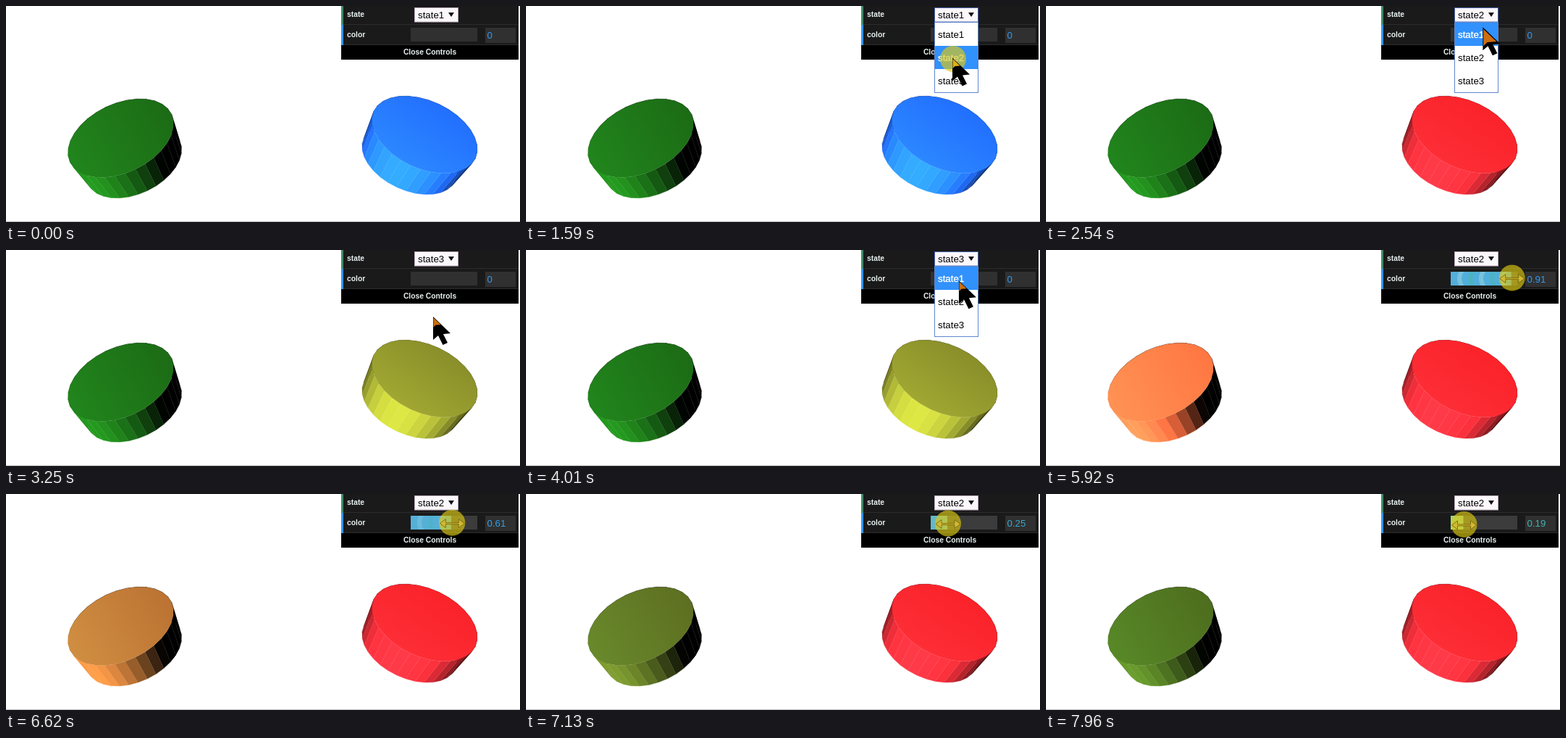
These frames come from a looping animation (710x298 px, 8 s). An HTML page:

```html
<!DOCTYPE html>
<html lang="en">
<head>
<meta charset="utf-8">
<title>Cylinder states</title>
<style>
  html, body { margin: 0; width: 100%; height: 100%; overflow: hidden; background: #fff; }
  svg { display: block; width: 710px; height: 298px; }
  text { font: 13.3px "Liberation Sans", Arial, sans-serif; }
  .label { font-size: 10.3px; font-weight: bold; fill: #e8f0f0; }
  .on { fill: #fff; stroke: #fff; stroke-width: .35px; }
</style>
</head>
<body>
<svg viewBox="0 0 710 298">
  <defs>
    <linearGradient id="gradL" gradientUnits="userSpaceOnUse" x1="95" y1="215" x2="222" y2="145"><stop/><stop offset="1"/></linearGradient>
    <linearGradient id="gradR" gradientUnits="userSpaceOnUse" x1="545" y1="218" x2="600" y2="138"><stop/><stop offset="1"/></linearGradient>
    <clipPath id="fillClip"><rect id="clipBar" x="559" y="30" height="19"/></clipPath>
  </defs>
  <rect y="297" width="710" height="1" fill="#bdbdbd"/>
  <g id="solids"></g>

  <g id="panel">
    <rect x="463" width="245" height="74"/>
    <rect x="463" width="245" height="54" fill="#2c2c2c"/>
    <rect x="463" width="245" height="25" fill="#1a1a1a"/>
    <rect x="463" y="26" width="245" height="27" fill="#1a1a1a"/>
    <rect x="463" width="3" height="26" fill="#42896a"/>
    <rect x="463" y="26" width="3" height="28" fill="#3493ee"/>
    <text class="label" x="471" y="15">state</text>
    <text class="label" x="471" y="43">color</text>
    <text class="label" x="585.5" y="67" text-anchor="middle">Close Controls</text>
    <rect id="track" x="559" y="30" width="92" height="19"/>
    <g clip-path="url(#fillClip)">
      <rect id="bar" x="559" y="30" width="92" height="19"/>
      <g id="streaks" fill="none"></g>
    </g>
    <rect x="662" y="30" width="42" height="21" fill="#303030"/>
    <text id="num" x="664.5" y="45"></text>
    <rect id="select" x="564.5" y="2.5" width="60" height="19.5" fill="#fbf7fb"/>
    <text id="value" x="569" y="17"></text>
    <path d="M611 9h8l-4 6z" fill="#111"/>
  </g>

  <g id="menu">
    <rect x="564.5" y="22.5" width="60" height="97" fill="#fff" stroke="#5f86cc"/>
    <rect id="hover" x="565" width="59" height="32" fill="#3191fd"/>
    <text x="569" y="44">state1</text>
    <text x="569" y="76">state2</text>
    <text x="569" y="108">state3</text>
  </g>

  <g id="pointer">
    <circle id="halo" r="18" fill="#dcc814" fill-opacity=".66"/>
    <g id="arrow" transform="translate(-1 -1.5)">
      <path d="M0 0V32L7 26L13.5 39L20 36L14 24L24 23Z"/>
      <path id="tint" d="M1 3V29L7 23L21 22Z"/>
    </g>
    <path id="resize" d="M-17 1L-9 -5V0H9V-5L17 1L9 7V2H-9V7Z" fill="#d2b932" stroke="#6f600a" stroke-width=".8"/>
  </g>
</svg>
<script>
const LOOP = 8000;
const $ = id => document.getElementById(id);
const set = (el, attrs) => { for (const k in attrs) el.setAttribute(k, attrs[k]); return el; };
const make = (tag, parent, attrs) =>
  parent.appendChild(set(document.createElementNS('http://www.w3.org/2000/svg', tag), attrs));
const show = (el, on) => { el.style.display = on ? '' : 'none'; };
const mix = (a, b, k) => a.map((n, i) => n + (b[i] - n) * k);
const clamp = (n, hi = 1) => Math.max(0, Math.min(hi, n));
const rgb = (c, light = 1) => `rgb(${c.map(n => Math.round(clamp(n * light, 255))).join()})`;
const rad = Math.PI / 180;
const cos = a => Math.cos(a * rad), sin = a => Math.sin(a * rad);

// Smooth step from 0 to 1 between two times.
function ease(t, from, to) {
  const k = clamp((t - from) / (to - from));
  return k * k * (3 - 2 * k);
}

// Tilted cylinder: top ellipse, plus a smaller bottom one shifted by (dx, dy).
function cylinder({ cx, cy, rx, ry, tilt, dx, dy, grad, light }) {
  const c = cos(tilt), s = sin(tilt), step = 11.25;
  const point = (a, low = 0) => {
    const k = 1 - .1 * low, x = rx * cos(a) * k, y = ry * sin(a) * k;
    return [cx + low * dx + x * c - y * s, cy + low * dy + x * s + y * c]
      .map(n => n.toFixed(2)).join();
  };
  const g = make('g', $('solids'), {});
  const angles = Array.from({ length: 32 }, (_, i) => i * step);
  const depth = a => sin(a + step / 2);
  const sides = [...angles].sort((a, b) => depth(a) - depth(b)).map(a => ({
    light: light(a + step / 2),
    el: make('polygon', g, {
      points: [point(a), point(a + step), point(a + step, 1), point(a, 1)].join(' '),
      'stroke-width': .3
    })
  }));
  make('polygon', g, { points: angles.map(a => point(a)).join(' '), fill: `url(#${grad})` });
  const stops = $(grad).children;
  return ({ near, far, side }) => {
    set(stops[0], { 'stop-color': rgb(near) });
    set(stops[1], { 'stop-color': rgb(far) });
    for (const f of sides) {
      const col = rgb(side, f.light);
      set(f.el, { fill: col, stroke: col });
    }
  };
}

const paintLeft = cylinder({
  cx: 158.5, cy: 182.3, rx: 77.6, ry: 47.5, tilt: -25.3, dx: 18.4, dy: 34, grad: 'gradL',
  light: a => a < 240 ? 1.2 * Math.max(0, sin(a - 60)) : 0
});
const paintRight = cylinder({
  cx: 578.3, cy: 177.5, rx: 77.4, ry: 46.5, tilt: 25, dx: -21, dy: 34.6, grad: 'gradR',
  light: a => .2 + .8 * Math.max(0, cos(a - 99))
});

const green = { near: [33, 132, 28], far: [28, 108, 21], side: [30, 129, 26] };
const coral = { near: [318, 146, 88], far: [290, 120, 70], side: [335, 135, 84] };
const looks = [
  { near: [44, 136, 255], far: [34, 112, 255], side: [52, 172, 400] },
  { near: [253, 46, 55], far: [251, 35, 42], side: [300, 58, 72] },
  { near: [162, 168, 50], far: [138, 143, 42], side: [222, 232, 68] }
];

// Each pick: menu opens, pointer settles over an option, option is clicked.
const picks = [
  { open: 770, over: 1460, click: 1690, state: 1 },
  { open: 2380, over: 2940, click: 3180, state: 2 },
  { open: 3780, over: 4240, click: 4690, state: 1 }
];
const GRAB = 5060, EDGE = 560, WIDTH = 92;
const head = [608, 14];
const option = state => [590, 48 + 25 * state];

function pointerAt(t) {
  let p = mix([412, 219], head, ease(t, 130, 600));
  picks.forEach(({ open, over, click, state }, i) => {
    const next = picks[i + 1];
    if (t >= open) p = mix(head, option(state), ease(t, open, over));
    if (t >= click) p = next
      ? mix(option(state), head, ease(t, click, next.open - 100))
      : mix(option(state), [EDGE, 37], ease(t, click, GRAB - 60));
  });
  return p;
}

// Drag right, hold, drag back, then creep a little further.
const dragAt = t =>
  .91 * ease(t, GRAB, 5900) - .66 * ease(t, 6200, 7100) - .06 * ease(t, 7100, 7900);

for (let i = 0; i < 5; i++) {
  const x = 575 + i * 15;
  make('path', $('streaks'), {
    d: `M${x} 28Q${x - 8} 39 ${x} 51`,
    stroke: i % 2 ? '#4ab6b8' : '#8acbdd', 'stroke-width': 6, opacity: .7
  });
}

const rows = [...$('menu').querySelectorAll('text')];
let lastState = -1, lastMix = -1;

function draw(t) {
  const drag = t >= GRAB;
  const raw = drag ? dragAt(t) : 0;
  const v = Math.round(raw * 100) / 100;
  const [x, y] = drag ? [EDGE + WIDTH * raw, 37 + 5 * (t - GRAB) / (LOOP - GRAB)] : pointerAt(t);
  const state = picks.reduce((s, p) => t >= p.click ? p.state : s, 0);
  const open = picks.some(p => t >= p.open && t < p.click);
  const pressed = drag || picks.some(p =>
    (t >= p.open - 60 && t < p.open + 70) || (t >= p.click - 150 && t < p.click));
  const sliding = t >= GRAB - 60;

  if (state !== lastState) paintRight(looks[lastState = state]);
  if (v !== lastMix) {
    lastMix = v;
    const look = {};
    for (const k in green) look[k] = mix(green[k], coral[k], v);
    paintLeft(look);
  }

  $('value').textContent = 'state' + (state + 1);
  set($('select'), { stroke: open ? '#4a66b4' : '#b9a9b9' });
  show($('menu'), open);
  const row = y < 23 ? state : clamp(Math.floor((y - 23) / 32), 2);
  set($('hover'), { y: 23 + row * 32 });
  rows.forEach((el, i) => el.classList.toggle('on', i === row));

  const fade = clamp((t - 6300) / 1600);
  set($('track'), { fill: sliding ? '#3c3c3c' : '#303030' });
  set($('bar'), { fill: rgb(mix([82, 174, 219], [152, 212, 136], fade * fade)) });
  set($('clipBar'), { width: WIDTH * v });
  set($('streaks'), { opacity: 1 - clamp(fade * 2) });
  $('num').textContent = v;
  set($('num'), { fill: rgb(mix([50, 152, 240], [66, 178, 178], fade)) });

  show($('pointer'), t >= 130);
  set($('pointer'), { transform: `translate(${x.toFixed(2)} ${y.toFixed(2)})` });
  show($('halo'), pressed);
  show($('arrow'), !sliding);
  show($('resize'), sliding);
  set($('tint'), { fill: pressed ? '#e2b014' : '#cd6e0f', transform: `scale(${1 - .5 * ease(y, 25, 45)})` });
}

const start = performance.now();
function tick() {
  draw((performance.now() - start) % LOOP);
  requestAnimationFrame(tick);
}
tick();
</script>
</body>
</html>
```
